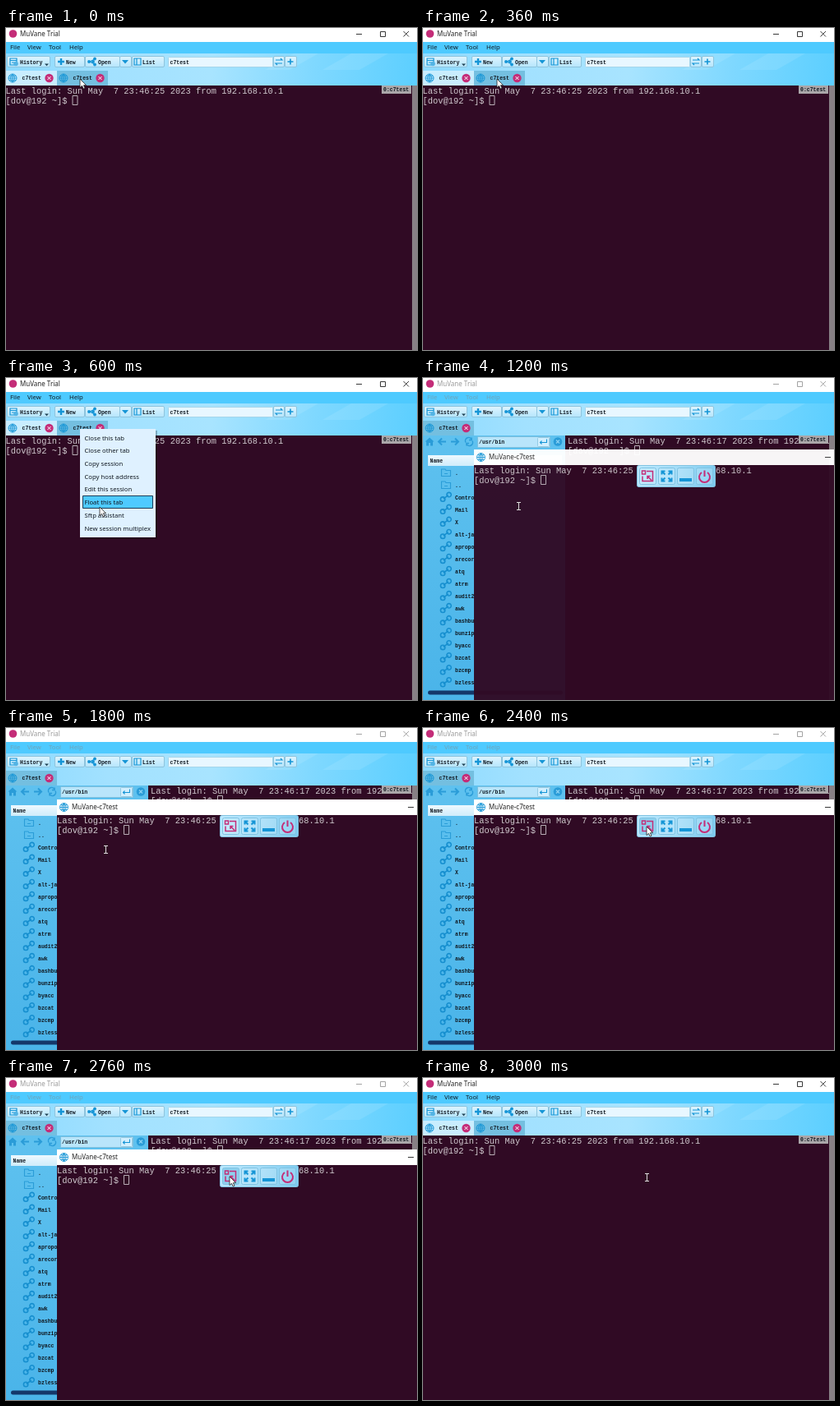
An HTML page with a canvas that plays this animation: 500 by 392 pixels, repeating every 3.6 s.

```html
<!DOCTYPE html>
<html lang="en">
<head>
<meta charset="utf-8">
<title>Terminal tabs</title>
<style>
  html, body { margin: 0; width: 100%; height: 100%; overflow: hidden; background: #fff; }
  canvas { display: block; width: 500px; height: 392px; }
</style>
</head>
<body>
<canvas id="stage" width="500" height="392"></canvas>
<script>
const ctx = document.getElementById('stage').getContext('2d');
const UI = '"Noto Sans", sans-serif';
const MONO = '"Liberation Mono", monospace';
const SKY = '#4ecaff', BLUE = '#1595d6', PINK = '#c42d78', DARK = '#300a24', INK = '#101820';
const STEP = 600, LOOP = 3600;

// One entry per step: what is open and where the pointer is.
const scenes = [
  { pointer: 'arrow', x: 90, y: 62 },
  { pointer: 'arrow', x: 114, y: 157, menu: true },
  { pointer: 'beam', x: 116, y: 156, floating: true, alpha: 0.96 },
  { pointer: 'beam', x: 121, y: 148, floating: true, alpha: 1 },
  { pointer: 'arrow', x: 272, y: 120, floating: true, alpha: 1, hover: true },
  { pointer: 'beam', x: 272, y: 121 }
];
const menuItems = ['Close this tab', 'Close other tab', 'Copy session', 'Copy host address',
  'Edit this session', 'Float this tab', 'Sftp assistant', 'New session multiplex'];
const files = ['.', '..', 'Contro', 'Mail', 'X', 'alt-ja', 'apropo', 'arecor', 'atq', 'atrm',
  'audit2', 'awk', 'bashbu', 'bunzip', 'byacc', 'bzcat', 'bzcmp', 'bzless'];

function rect(x, y, w, h, fill, stroke, radius = 0) {
  ctx.beginPath();
  ctx.roundRect(x, y, w, h, radius);
  if (fill) { ctx.fillStyle = fill; ctx.fill(); }
  if (stroke) { ctx.strokeStyle = stroke; ctx.lineWidth = 1; ctx.stroke(); }
}

function circle(x, y, r, fill) {
  ctx.beginPath();
  ctx.arc(x, y, r, 0, 7);
  ctx.fillStyle = fill;
  ctx.fill();
}

function path(d, x, y, stroke, width = 1, fill) {
  ctx.save();
  ctx.translate(x, y);
  const shape = new Path2D(d);
  if (fill) { ctx.fillStyle = fill; ctx.fill(shape); }
  if (stroke) { ctx.strokeStyle = stroke; ctx.lineWidth = width; ctx.stroke(shape); }
  ctx.restore();
}

// y is the middle of the capitals
function text(str, x, y, size = 7.7, color = INK, family = UI, weight = '') {
  ctx.font = `${weight} ${size}px ${family}`;
  ctx.fillStyle = color;
  ctx.fillText(str, x, y + size * 0.35);
}

const label = (str, x, y, color) => text(str, x, y, 6.5, color, MONO, 'bold');

function gradient(x0, y0, x1, y1, ...colors) {
  const g = ctx.createLinearGradient(x0, y0, x1, y1);
  colors.forEach((c, i) => g.addColorStop(i / (colors.length - 1), c));
  return g;
}

function terminal(x, y, w, h, textX, seconds) {
  rect(x, y, w, h, DARK);
  ctx.save();
  ctx.beginPath();
  ctx.rect(x, y, w, h);
  ctx.clip();
  text(`Last login: Sun May  7 23:46:${seconds} 2023 from 192.168.10.1`, textX, y + 6.3, 10.43, '#cfc8cd', MONO);
  text('[dov@192 ~]$', textX, y + 18.3, 10.43, '#cfc8cd', MONO);
  rect(textX + 81.5, y + 12.5, 6, 11, null, '#b8aeb6');
  ctx.restore();
}

function badge() {
  rect(457, 70, 36, 10, '#aaa6a9');
  label('0:c7test', 459, 75);
}

function globe(x, y) {
  path('M-5 0A5 5 0 1 0 5 0A5 5 0 1 0-5 0M-5 0H5M0-5V5M-4-2.7H4M-4 2.7H4M0-5Q-5 0 0 5Q5 0 0-5', x, y, BLUE, 0.9);
}

function tab(x, selected) {
  rect(x, 52, 62, 18, selected ? '#74bfe0' : '#c9edfe');
  globe(x + 8, 61);
  label('c7test', x + 19.5, 61);
  circle(x + 52.5, 61, 5.2, PINK);
  path('M-2-2L2 2M2-2L-2 2', x + 52.5, 61, '#fff', 1);
}

function button(x, w, str, textX) {
  rect(x + 0.5, 34.5, w, 13, gradient(0, 34, 0, 48, '#e0f5ff', '#b4e5fc'), '#8ec4dd', 1.5);
  if (str) label(str, textX, 41.5);
}

function toolbar() {
  rect(0, 31, 500, 39, gradient(0, 31, 500, 70, '#8cdaff', '#a2e1ff', '#a8e4ff', '#7fd8ff', '#5ccfff'));
  path('M350 31H380L345 51H315ZM420 31H465L430 51H385Z', 0, 0, null, 1, '#ffffff18');
  button(1, 52, 'History', 17);
  path('M-4-4H4V4H-4ZM-4-1.5H4M-2 1H1', 9, 41, BLUE, 1.2);
  circle(12, 43.5, 2.8, '#54b4e4');
  path('M-2.5-1H2.5L0 1.8Z', 49.5, 44.5, null, 1, '#245');
  button(59, 36, 'New', 73);
  path('M-4 0H4M0-4V4', 67, 41, BLUE, 2.4);
  button(96, 42, 'Open', 112);
  path('M3-3L-3 0L3 3', 105, 41, BLUE, 1.3);
  [[101, 41], [108, 37.5], [108, 44.5], [106, 41]].forEach(([x, y]) => circle(x, y, 1.9, BLUE));
  button(138, 14);
  path('M-4-2H4L0 2.5Z', 145, 41, null, 1, BLUE);
  button(153, 39, 'List', 166);
  path('M-4-4H4V4H-4ZM-1-4V4', 160, 41, BLUE, 1.2);
  rect(197.5, 35.5, 127, 12, '#e8f7ff', '#a5d5ea', 1);
  label('c7test', 199.5, 41.5);
  button(325, 13);
  path('M-4-2H4L2-4M4 2H-4L-2 4', 332, 41, BLUE, 1.2);
  button(339, 14);
  path('M-3.5 0H3.5M0-3.5V3.5', 346, 41, BLUE, 1.6);
}

function mainWindow(inactive) {
  const titleInk = inactive ? '#999' : '#222';
  rect(0, 0, 500, 17, '#fff');
  circle(8.5, 7, 4.8, PINK);
  text('MuVane Trial', 17, 7.5, 8, titleInk);
  path('M426 7.5H433M455.5 4.5H461.5V10.5H455.5ZM483.5 4L490 10.5M490 4L483.5 10.5', 0, 0, titleInk, 0.9);
  rect(0, 17, 500, 14, SKY);
  [['File', 5], ['View', 26], ['Tool', 52], ['Help', 77]].forEach(([s, x]) =>
    text(s, x, 23.7, 7.7, inactive ? '#6fa3ba' : INK));
  toolbar();
}

function fileIcon(i, y) {
  if (i < 2) path('M-5.5-4H-1L0-2.5H5.5V4.5H-5.5ZM-2 1.5H2', 28, y, '#2a9dd8', 1.1);
  else path('M-1.5 2.5A2.7 2.7 0 1 1-6.9 2.5A2.7 2.7 0 1 1-1.5 2.5M6-3A2.7 2.7 0 1 1 .6-3A2.7 2.7 0 1 1 6-3M-3.5 2L2.5-2.5', 28.3, y, '#168fcf', 1.6);
}

function sidebar() {
  const navInk = '#2a9cd8';
  rect(0, 70, 173, 322, gradient(0, 70, 0, 392, '#5ec1ef', '#4ab4e9'));
  path('M-5.5 0L0-5L5.5 0H4V5H1V1.5H-1V5H-4V0Z', 8, 77.5, null, 1, navInk);
  path('M5 0H-4M0-4L-4 0L0 4', 23, 77.5, navInk, 2);
  path('M-5 0H4M0-4L4 0L0 4', 39, 77.5, navInk, 2);
  path('M-4 1A4 4 0 0 1 3-3M4-1A4 4 0 0 1-3 3M3-5V-2H0M-3 5V2H0', 56, 77.5, navInk, 1.5);
  rect(66.5, 71.5, 88, 13, '#b9e5fb', '#7fbfdd', 1);
  label('/usr/bin', 68, 77.5);
  rect(139.5, 72.5, 14, 11, '#d2efff', '#94cbe3', 1);
  path('M4-3V1H-4M-2-1L-4 1L-2 3', 146.5, 77.5, BLUE, 1.1);
  circle(164, 77.5, 5.3, navInk);
  path('M-2-2L2 2M2-2L-2 2', 164, 77.5, '#8fd3f3', 1.1);
  rect(6, 94, 163, 13, gradient(0, 94, 0, 107, '#eef9ff', '#cfecfb'));
  label('Name', 8.5, 101);
  files.forEach((name, i) => {
    const y = 115 + i * 15.03;
    fileIcon(i, y);
    label(name, 39, y + 0.3);
  });
  rect(6, 380.5, 164, 5, '#14386b', null, 2.5);
}

function floatTools(hover) {
  rect(260.5, 106.5, 95, 26, gradient(260, 106, 355, 132, '#bdeaff', '#a4ddf8', '#7ccbf0'), '#82c4e2', 2);
  for (let i = 0; i < 4; i++) {
    const pressed = hover && i === 0;
    rect(263.5 + i * 23, 109.5, 20, 20, pressed ? '#8fd0ee' : '#ffffff28', '#7fc3e2', 2);
  }
  path('M-1-6H6.5V6H-6V0M-6.5-6.5H-2.5V-2.5H-6.5ZM5 5L0 0M0 3.5V0H3.5', 273, 119.5, PINK, 1.5);
  path('M-2-2L-6-6M-6-2V-6H-2M2-2L6-6M2-6H6V-2M-2 2L-6 6M-6 2V6H-2M2 2L6 6M2 6H6V2', 296.5, 119.5, BLUE, 2);
  rect(312, 122, 15, 4, BLUE);
  path('M-3.5-5A6.5 6.5 0 1 0 3.5-5M0-7.5V0', 342.5, 120, PINK, 2);
}

function floatWindow({ alpha, hover }) {
  ctx.globalAlpha = alpha;
  rect(62, 87, 438, 19, '#fff');
  globe(70.5, 96.5);
  text('MuVane-c7test', 80, 96.6, 8, '#222');
  path('M489 96.5H496', 0, 0, '#222', 0.9);
  terminal(62, 106, 438, 286, 62, 25);
  ctx.globalAlpha = 1;
  floatTools(hover);
}

function contextMenu() {
  rect(92, 64, 92, 132, '#00000040');
  rect(90, 62, 92, 132, '#dff1ff');
  rect(93.5, 143.5, 85, 15, SKY, '#1c3d55');
  menuItems.forEach((item, i) => text(item, 95.5, 73 + i * 15.7));
}

function drawPointer({ pointer, x, y }) {
  if (pointer === 'arrow') path('M0 0V10.5L2.5 8.3L4.2 12L6 11.2L4.4 7.7H7.6Z', x, y, '#222', 0.8, '#fff');
  else path('M-2.5-4.5H2.5M0-4.5V4.5M-2.5 4.5H2.5', x + 0.5, y, '#ddd', 1);
}

function draw(scene) {
  ctx.clearRect(0, 0, 500, 392);
  mainWindow(scene.floating);
  tab(0, scene.floating);
  if (scene.floating) {
    terminal(173, 70, 321, 322, 176, 17);
    sidebar();
  } else {
    tab(62, true);
    terminal(0, 70, 494, 322, -0.5, 25);
  }
  rect(494, 70, 6, 322, '#878085');
  badge();
  if (scene.floating) floatWindow(scene);
  if (scene.menu) contextMenu();
  drawPointer(scene);
}

function frame() {
  draw(scenes[Math.floor(performance.now() % LOOP / STEP)]);
  requestAnimationFrame(frame);
}
frame();
</script>
</body>
</html>
```
